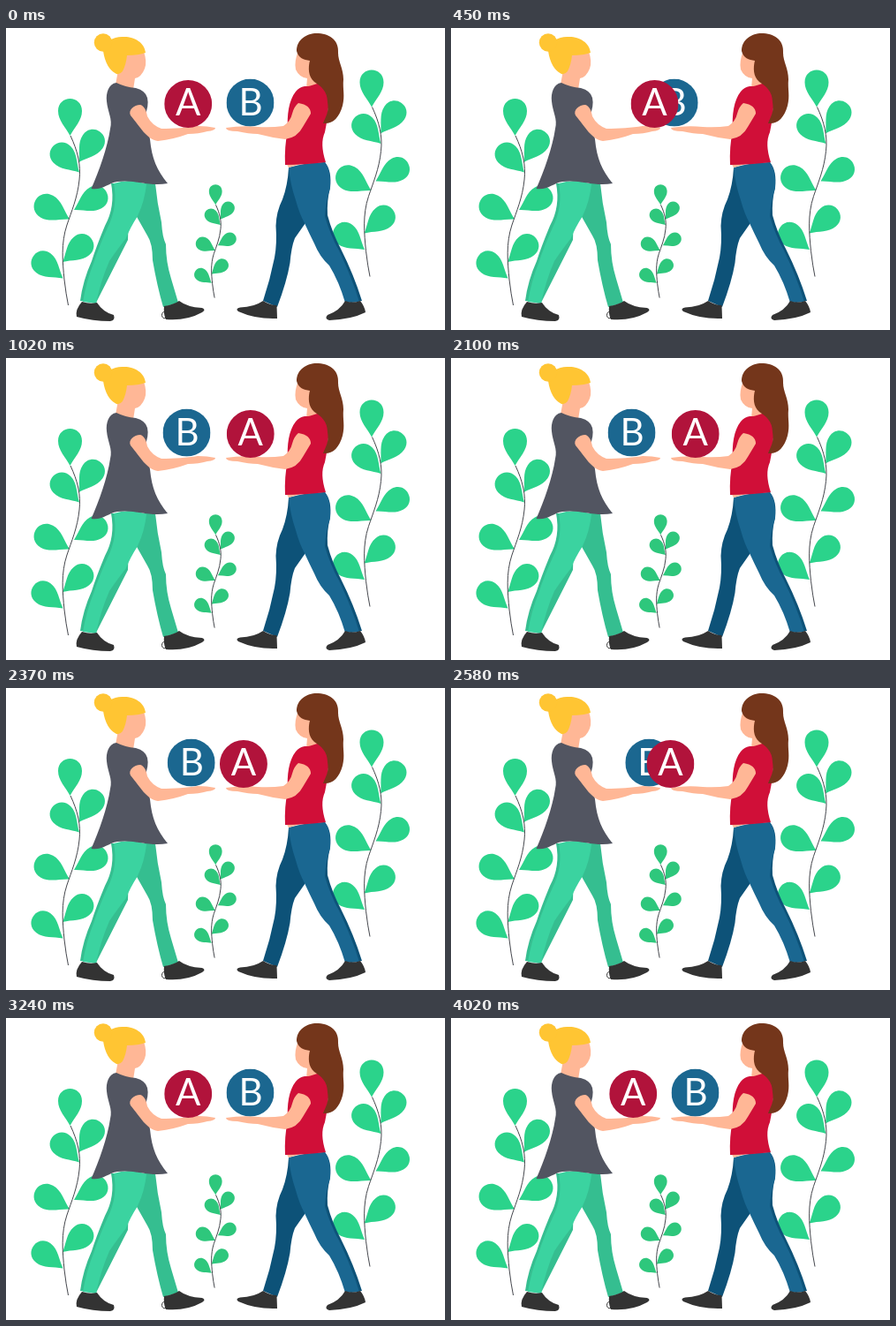
These frames come from a looping animation (497x342 px, 4.56 s). An HTML page:

```html
<!DOCTYPE html>
<html lang="en">
<head>
<meta charset="utf-8">
<title>A/B swap</title>
<style>
  html, body { margin: 0; width: 100%; height: 100%; overflow: hidden; background: #fff; }
  svg { display: block; width: 100%; height: 100%; }
  .ball { animation: 4560ms linear infinite; }
  .ball text { font: 42px Lato, "Open Sans", sans-serif; fill: #fff; text-anchor: middle; }
  #a { animation-name: swap-a; }
  #b { animation-name: swap-b; }
  .stem { fill: none; stroke: #45474d; stroke-width: 1; vector-effect: non-scaling-stroke; }
  .skin { fill: #ffb796; }
  .shoe { fill: #333; }

  @keyframes swap-a {
    0%, .658% { transform: translate(206.2px, 86px); animation-timing-function: cubic-bezier(.45, 0, .58, 1); }
    22.588%, 45.395% { transform: translate(276.8px, 86px); animation-timing-function: cubic-bezier(.52, 0, .42, 1); }
    71.272%, 100% { transform: translate(206.2px, 86px); }
  }
  @keyframes swap-b {
    0%, .658% { transform: translate(276.5px, 84.6px); animation-timing-function: cubic-bezier(.47, 0, .58, 1); }
    22.588%, 45.395% { transform: translate(204.5px, 84.6px); animation-timing-function: cubic-bezier(.635, 0, .47, 1); }
    71.272%, 100% { transform: translate(276.5px, 84.6px); }
  }
</style>
</head>
<body>
<svg viewBox="0 0 497 342" preserveAspectRatio="none">
  <defs>
    <path id="leaf" d="M0 0C-5-10-13.5-17-13.5-28C-13.5-37-7-42 0-42S13.5-37 13.5-28C13.5-17 5-10 0 0Z"/>
    <g id="plant">
      <use href="#leaf" transform="translate(72.5 122)"/>
      <use href="#leaf" transform="translate(82.5 152) rotate(34)"/>
      <use href="#leaf" transform="translate(83 163.5) rotate(-44)"/>
      <use href="#leaf" transform="translate(77 206) rotate(61)"/>
      <use href="#leaf" transform="translate(72 216.5) rotate(-61) scale(1.05)"/>
      <use href="#leaf" transform="translate(64 265) rotate(50)"/>
      <use href="#leaf" transform="translate(64.5 283.5) rotate(-52)"/>
      <path class="stem" d="M73 122C81 139 85 155 83 172C81 192 74 208 69 223C62 244 64 265 66 285Q68 302 70.5 314"/>
    </g>
  </defs>

  <use href="#plant" fill="#2bd38b"/>
  <use href="#plant" fill="#2bd38b" transform="translate(341.5 -32.5)"/>
  <use href="#plant" fill="#2ec77c" transform="translate(197.5 133.5) scale(.548)"/>

  <g id="left-woman">
    <path fill="#35be90" d="M153 176L169 176Q171 198 176 220Q177 237 181 245Q181 265 187 284L195 311L178 316Q171 292 166 263Q166 244 160 235L147 212Z"/>
    <path fill="#35be90" d="M119 176H140L138 240L102 311L84 309Q87 286 97 264Q102 248 112 224Q124 202 119 176Z"/>
    <path fill="#3bd3a0" d="M122 176Q140 170 159 177Q157 196 149 213Q140 227 136 238Q125 252 117 264Q107 287 102 312L87 310Q91 286 100 264Q105 248 115 226Q127 202 122 176Z"/>
    <path class="shoe" d="M86 310Q95 313 103 311Q110 322 122 325Q124 331 118 332Q98 332 80 327Q78 319 86 310Z"/>
    <path class="shoe" d="M179 315Q190 313 196 309Q205 316 222 317Q227 319 222 322Q204 332 181 330Q178 324 179 315Z"/>
    <path fill="none" stroke="#333" d="M180 321.5Q176.5 321 176.5 325.5Q177 329.5 181 328.5"/>
    <path class="skin" d="M134 32Q147 26 156 27Q160 38 157 46Q153 56 146 57L144 70Q132 68 124 64L127 48Z"/>
    <path fill="#ffc533" d="M110 26C112 14 123 9 134 10C146 10 157 17 158 28Q150 31 137 31Q136 41 132 49Q129 53 125 52Q113 46 110 26Z"/>
    <circle cx="110" cy="16.5" r="10.2" fill="#ffc533"/>
    <path fill="#525561" d="M125 62C116 63 113 74 114 83C115 95 121 103 118 114C115 135 105 163 96.5 182C109 184 115 176 126 174C146 171 162 180 183 176C171 161 165 148 163 126L157 100Q162 88 160 79Q158 71 147 68Q135 67 125 62Z"/>
    <path class="skin" d="M141 99C138 93 145 87 152 87C156 88 159 93 160 100Q165 110 176 114C190 114 205 113 217 111Q228 111 237 113Q237 116 228 117Q218 120 206 120Q190 126 172 128C159 126 152 112 141 99Z"/>
  </g>

  <g id="right-woman">
    <path fill="#0d5278" d="M320 158Q319 178 313 194Q306 208 305.5 224Q307 244 304 260Q299 285 291 309L307 316Q318 287 321.5 266Q323 248 327 238L341 218Z"/>
    <path id="front-leg" fill="#0d5278" d="M340 156L361 152Q369 161 367 181Q363 196 364 212Q369 231 379 250Q394 280 403 309L390 311Z"/>
    <path fill="#1a6791" d="M320 158Q340 152 361 152Q368 161 367 181Q362 196 361 213Q367 234 377 252Q391 281 400 310L384 311Q377 287 366 269Q355 259 349 244Q343 232 338 221Q332 210 328 195Q322 178 320 158Z"/>
    <path class="skin" d="M317 153L337 153L320 158Z"/>
    <path class="shoe" d="M291 309Q299 314 306.5 314L307 329Q283 330 263 321Q259 318 265 316.5Q281 316 291 309Z"/>
    <path class="shoe" d="M384 309Q392 312 401 309Q406 315 407 322Q391 330 366 331Q360 329 364 325Q378 320 384 309Z"/>
    <path class="skin" d="M331 26Q326 38 328 47Q332 56 341 57L340 68L356 66L352 34Z"/>
    <path fill="#d00f38" d="M338 66C346 67 354 60 361 62Q366 75 365 90Q364 105 361 118Q355 131 362 152Q338 155 316 155Q315 135 319 115C318 99 320 82 328 72Q332 67 338 66Z"/>
    <path class="skin" d="M345 97Q345 87 331 85Q326 89 324 97Q322 106 314 111Q300 113 285 112Q268 110 249 113Q249 117 262 117Q275 120 285 120Q300 124 316 126Q330 124 336 112Z"/>
    <path fill="#74361b" d="M329 26C329 12 342 5 354 6C368 7 377 15 376 28C376 38 382 46 382 58C381 70 384 76 381 88C377 102 370 109 359 108C362 100 366 95 364 84C364 72 357 66 349 61C342 55 342 45 344 37C337 36 331 34 329 26Z"/>
  </g>

  <g id="b" class="ball"><circle r="27" fill="#1b6790"/><text x=".5" y="14">B</text></g>
  <g id="a" class="ball"><circle r="27" fill="#b1133b"/><text y="12.5">A</text></g>
</svg>
</body>
</html>
```
